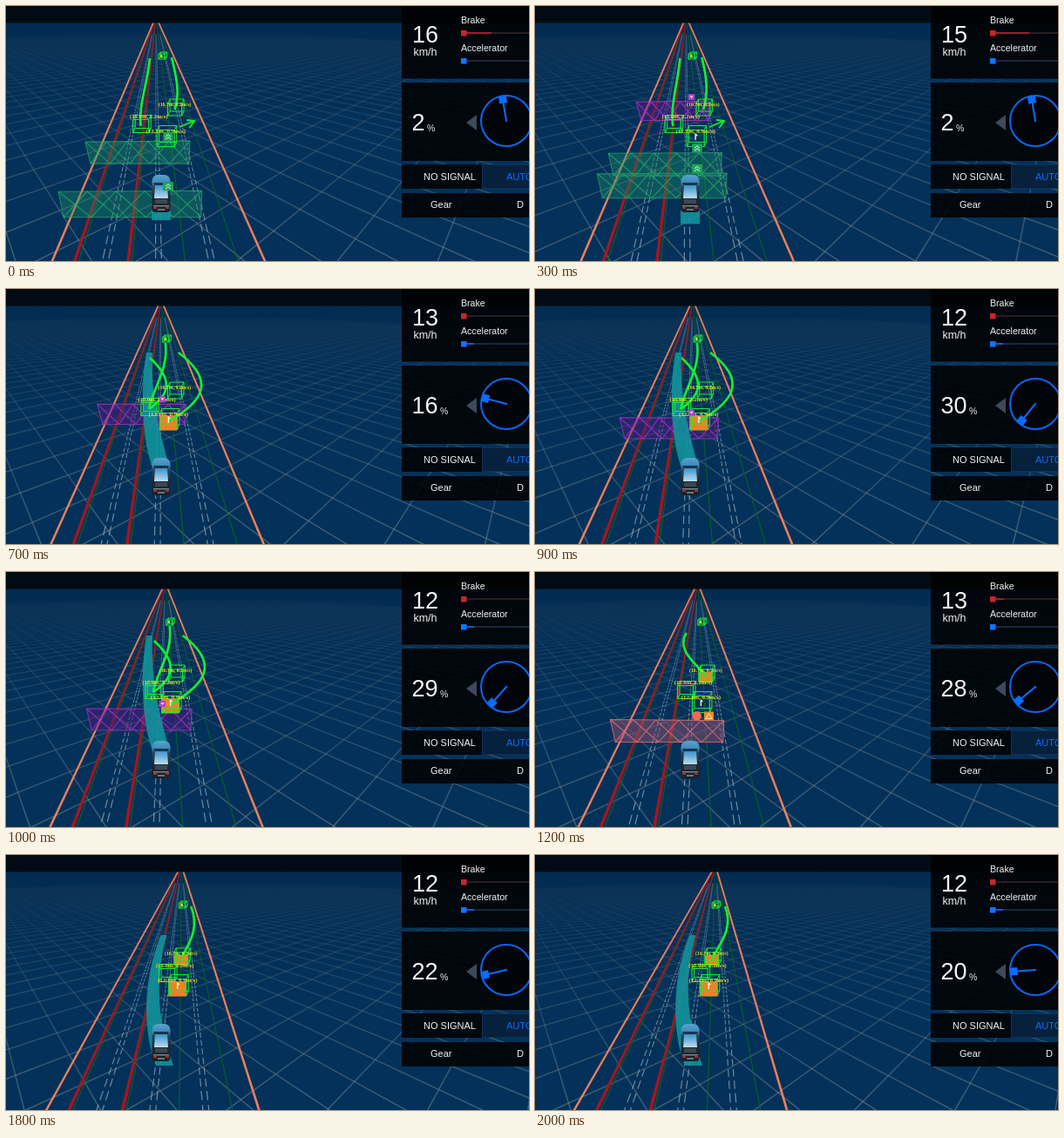
An HTML page with a canvas that plays this animation: 600 px wide and 293 px high, repeating every 2.1 s.

```html
<!DOCTYPE html>
<html lang="en">
<head>
<meta charset="utf-8">
<title>Driving view</title>
<style>
html, body { margin: 0; width: 100%; height: 100%; overflow: hidden; background: #032f57; }
canvas, svg { position: absolute; left: 0; top: 0; width: 600px; height: 293px; }
text { font-family: "Liberation Sans", Arial, sans-serif; fill: #f2f4f6; }
</style>
</head>
<body>
<canvas id="road" width="600" height="293"></canvas>
<svg viewBox="0 0 600 293">
  <g fill="#000" fill-opacity=".86">
    <rect x="454" y="0" width="146" height="83.5"/>
    <rect x="454" y="88" width="146" height="90"/>
    <rect x="454" y="182" width="146" height="28"/>
    <rect x="454" y="215" width="146" height="28"/>
  </g>
  <rect x="546.5" y="182.5" width="60" height="27" fill="#07203b" stroke="#0b3259"/>
  <text id="speed" x="481" y="42" font-size="27" text-anchor="middle"></text>
  <text x="481" y="57" font-size="12.5" text-anchor="middle">km/h</text>
  <text x="522" y="20" font-size="10.6">Brake</text>
  <text x="522" y="52" font-size="10.6">Accelerator</text>
  <path d="M522 31H600" stroke="#57343d"/>
  <path id="brake" stroke="#c21f2b" stroke-width="1.5"/>
  <rect x="522" y="28" width="6.5" height="6.5" fill="#c4272f"/>
  <path d="M522 63H600" stroke="#33496b"/>
  <path id="gas" stroke="#0b6cff" stroke-width="1.5"/>
  <rect x="522" y="60" width="6.5" height="6.5" fill="#1473ff"/>
  <text id="steer" x="465.5" y="143" font-size="27"></text>
  <text id="unit" y="144" font-size="10.5">%</text>
  <path d="M528 134L540 125V143Z" fill="#3d4a5a"/>
  <circle cx="574" cy="132" r="29" fill="#01050a" stroke="#0b66f5" stroke-width="2"/>
  <g id="wheel" fill="#0b6cff">
    <rect x="573" y="107" width="2" height="26"/>
    <rect x="569.5" y="103.5" width="9" height="8"/>
  </g>
  <text x="479" y="199.5" font-size="11">NO SIGNAL</text>
  <text x="574" y="199.5" font-size="11" style="fill:#0b6cff">AUTO</text>
  <text x="487" y="232" font-size="11">Gear</text>
  <text x="586" y="232" font-size="11">D</text>
</svg>
<script>
const g = document.getElementById('road').getContext('2d');
const el = id => document.getElementById(id);
const LOOP = 2100, STEP = 100;
const HORIZON = 12, DEPTH = 281, NEAR = 19, ROAD = 244;
const GREEN = '#14ee34';

// Each path leads from a tip beside the vanishing point to an obstacle.
const phases = [
  { name: 'cruise', until: 600, filled: [],
    paths: [{ to: 1, dx: -7, y: 60, bend: -3 }, { to: 0, dx: 18, y: 59, bend: 6 }] },
  { name: 'swerve', until: 1000, filled: [2],
    paths: [{ to: 1, dx: 5, y: 62, bend: 4 }, { to: 2, dx: 20, y: 73, bend: 42 }, { to: 1, dx: -13, y: 79, bend: 26 }] },
  { name: 'stop', until: 1600, filled: [0],
    paths: [{ to: 0, dx: -13, y: 70, bend: -12 }] },
  { name: 'pass', until: LOOP, filled: [0, 2],
    paths: [{ to: 0, dx: 11, y: 59, bend: 10 }] }
];
// u is the place across the road, from 0 to 1; drift is its change over the loop.
const obstacles = [
  { u: .72, drift: -.1, y: 119, w: 16, h: 14, text: '(16.7m, 0.2m/s)', size: 5.8, at: [0, -4] },
  { u: .33, drift: .17, y: 138, w: 18, h: 15, text: '(15.0m, 2.2m/s)', size: 6.7, at: [9, -9] },
  { u: .58, drift: .02, y: 152, w: 20, h: 19, text: '(12.1m, 0.9m/s)', size: 7, at: [0, -6] }
];
const walls = [
  { depth: 6.94, from: 0, to: 500 },
  { depth: 4.97, from: 0, to: 100 },
  { depth: 7.77, from: 200, to: 400 },
  { depth: 11.6, from: 200, to: 1600, ahead: true }
];
const paint = {
  go: ['rgba(28,140,98,.4)', 'rgba(42,175,110,.65)'],
  yield: ['rgba(88,24,128,.45)', 'rgba(170,48,200,.75)'],
  stop: ['rgba(150,80,115,.48)', 'rgba(232,112,108,.75)']
};

const mix = (a, b, p) => a + (b - a) * p;
const mixPoint = (a, b, p) => [mix(a[0], b[0], p), mix(a[1], b[1], p)];

function line(points, color, width, fill) {
  g.beginPath();
  points.forEach(p => g.lineTo(p[0], p[1]));
  if (fill) { g.closePath(); g.fillStyle = fill; g.fill(); }
  if (color) { g.strokeStyle = color; g.lineWidth = width; g.stroke(); }
}
function rect(x, y, w, h, color) {
  g.fillStyle = color;
  g.fillRect(x, y, w, h);
}

function view(t) {
  const p = t / 2000, swing = p ** 1.7;
  const vanish = 172 + 35 * swing, left = 53 - 8 * swing;
  const lane = (u, y) => [vanish + (left + ROAD * u - vanish) * (y - HORIZON) / DEPTH, y];
  return {
    t, p, swing, vanish, lane,
    travel: t / 40,
    phase: phases.find(f => t <= f.until),
    ground: (x, z) => lane(.5 + x / 14, HORIZON + DEPTH * NEAR / z)
  };
}

function drawGround({ ground, travel }) {
  const sky = g.createLinearGradient(0, 19, 0, 140);
  sky.addColorStop(0, '#022b51');
  sky.addColorStop(1, '#033159');
  rect(0, 0, 600, 293, sky);
  const fade = g.createLinearGradient(0, 30, 0, 293);
  [0, .25, .6, 1].forEach(p => fade.addColorStop(p, `rgba(125,140,148,${.5 * p})`));
  const cell = 4;
  for (const angle of [.65, .65 + Math.PI / 2]) {
    const c = Math.cos(angle), s = Math.sin(angle);
    const shift = (travel * s) % cell;
    for (let i = -60; i <= 60; i++) {
      const d = i * cell - shift;
      line([14, 260].map(z => ground(d * c - s * (z - d * s) / c, z)), fade, 1.5);
    }
  }
}

function drawRoad({ lane, travel }) {
  const stripe = (u, w, far, color) => {
    const [a, b] = [lane(u, 293), lane(u, 19)];
    line([[a[0] - w, 293], [a[0] + w, 293], [b[0] + far, 19], [b[0] - far, 19]], null, 0, color);
  };
  for (const u of [.125, .375, .625, .875]) stripe(u, .7, .4, 'rgba(10,100,36,.85)');
  for (const u of [.25, .5, .75])
    for (const off of [-.014, .014])
      for (let z = 18 - travel % 1.2; z < 260; z += 1.2)
        line([z, z + .8].map(d => lane(u + off, HORIZON + DEPTH * NEAR / d)), 'rgba(185,200,210,.6)', .6 + 12 / z);
  for (const u of [.106, .358]) stripe(u, 2, .6, '#a01725');
  for (const u of [0, 1]) stripe(u, 1.4, .9, '#ef805c');
}

function wallAt(w, { t, swing }) {
  const kind = !w.ahead ? 'go' : t > 1000 ? 'stop' : 'yield';
  const depth = Math.max(w.depth - .0047 * t, w.ahead ? 6.35 : 0);
  const y = HORIZON + 1000 / depth, h = 25 + .08 * (y - 156), side = 6 * swing;
  const x1 = 91 - .54 * (y - 156) + side, x2 = 211 + .24 * (y - 156) + side;
  return { kind, y, corners: [[x1, y], [x2, y - 1 + 5 * swing], [x2 - 1, y + h], [x1 + 6, y + h]] };
}

function drawWall({ kind, corners: [a, b, c, d] }) {
  const [fill, edge] = paint[kind], n = 5;
  line([a, b, c, d, a], edge, 1.1, fill);
  for (let i = 0; i < n; i++) {
    const p = i / n, q = (i + 1) / n;
    line([mixPoint(a, b, p), mixPoint(d, c, q)], edge, 1.2);
    line([mixPoint(a, b, q), mixPoint(d, c, p)], edge, 1.2);
  }
}

function drawBadge({ kind, y: top }) {
  const y = top - 6;
  if (kind === 'go') {
    const w = 8 + top / 50;
    rect(186 - w / 2, y - 5, w, 10, '#1fa35c');
    for (const o of [0, 3]) line([[183, y + o], [186, y - 2.5 + o], [189, y + o]], '#d9f5e4', 1);
  } else if (kind === 'yield') {
    rect(176, y - 3, 7, 7, '#b63bd0');
    line([[177.5, y - 1], [181.5, y - 1], [179.5, y + 2]], null, 0, '#f0d8f5');
  } else {
    const octagon = [...Array(8)].map((_, i) => {
      const r = (i + .5) * Math.PI / 4;
      return [185.5 + 5.6 * Math.cos(r), y + 2 + 5.6 * Math.sin(r)];
    });
    line(octagon, null, 0, '#f0685a');
    rect(194, y - 3, 11, 10, '#f08a1e');
    line([[199.5, y - 1], [203, y + 5], [196, y + 5], [199.5, y - 1]], '#fff0d0', 1);
  }
}

// Planned route: a band along a quadratic curve, wider towards the car
function band([x0, y0], bend, [x1, y1]) {
  const sides = [[], []];
  for (let s = 0; s <= 1.001; s += .05) {
    const x = mix(mix(x0, bend, s), mix(bend, x1, s), s), y = mix(y0, y1, s);
    const half = mix(3.5, 10, Math.min(1, s * 1.2));
    sides[0].push([x - half, y]);
    sides[1].unshift([x + half, y]);
  }
  line(sides.flat(), null, 0, 'rgba(18,150,158,.88)');
}

function drawRoute({ t, phase }) {
  if (phase.name === 'cruise') rect(167, 235, 22, 11 + 6 * Math.sin(t / 130), 'rgba(18,150,158,.88)');
  if (phase.name === 'swerve') band([164.5, 73], 158, [177, 203]);
  if (phase.name === 'pass') band([181, 92], 156, [182, 242]);
}

function drawCar() {
  const body = g.createLinearGradient(0, 194, 0, 238);
  [['#57a4d0', 0], ['#3f86b4', .22], ['#28475c', .3], ['#20272e', .6], ['#1b2025', 1]]
    .forEach(([c, p]) => body.addColorStop(p, c));
  g.fillStyle = body;
  g.beginPath();
  g.roundRect(167.5, 194, 21, 43, [7, 7, 4, 4]);
  g.fill();
  line([[169, 203], [187, 203], [185, 207], [171, 207]], null, 0, '#17364c');
  const roof = g.createLinearGradient(0, 206, 0, 222);
  roof.addColorStop(0, '#3d91ca');
  roof.addColorStop(1, '#c3e2f3');
  line([[171, 206], [185, 206], [186, 221], [170, 221]], null, 0, roof);
  rect(171, 222, 14, 5, '#3a4853');
  rect(169, 229, 18, 1.5, '#77838c');
  for (const x of [169, 183]) rect(x, 231, 4, 2, '#a03037');
  rect(174, 233, 8, 2, '#69747c');
}

function drawBox(x, y, w, h, depth) {
  const front = [[x, y], [x + w, y], [x + w, y + h], [x, y + h], [x, y]];
  const back = front.map(p => [p[0] + 2.5, p[1] - depth]);
  line(front, GREEN, 1.2);
  line(back, GREEN, 1);
  for (let i = 0; i < 4; i++) line([front[i], back[i]], GREEN, 1);
}

function drawTraffic({ p, vanish, lane, phase }) {
  const [far] = lane(.655, 57);
  drawBox(far - 3.5, 55, 7, 6, 2);
  rect(far - 2, 56, 3, 3, '#b5d829');

  const centers = obstacles.map(o => lane(o.u + o.drift * p, o.y));
  obstacles.forEach(({ w, h }, i) => {
    const x = centers[i][0] - w / 2, y = centers[i][1] - h / 2;
    if (phase.filled.includes(i)) rect(x, y + 3, w, h - 2, '#ee8326');
    drawBox(x, y, w, h, 5);
  });

  g.strokeStyle = GREEN;
  g.lineWidth = 2.7;
  phase.paths.forEach(({ to, dx, y, bend }) => {
    const [x2, y2] = centers[to], x = vanish + dx;
    g.beginPath();
    g.moveTo(x, y);
    g.bezierCurveTo(x + bend, mix(y, y2, .4), x2 + bend, mix(y, y2, .7), x2, y2);
    g.stroke();
  });

  const [x, y] = centers[2];
  if (phase.name === 'cruise') {
    line([[x + 16, y - 13], [x + 33, y - 20], [x + 24, y - 21]], GREEN, 1.8);
    line([[x + 33, y - 20], [x + 27, y - 12]], GREEN, 1.8);
  }
  line([[x, y + 2], [x, y - 5], [x + 2, y - 3]], '#f2fff2', 1.3);

  g.fillStyle = '#e8e020';
  g.textAlign = 'center';
  obstacles.forEach(({ text, size, at }, i) => {
    g.font = `bold ${size}px "Liberation Serif", serif`;
    g.fillText(text, centers[i][0] + at[0], centers[i][1] + at[1]);
  });
}

function drawPanel({ t, phase: { name } }) {
  const bump = .9 * Math.exp(-(((t - 1170) / 120) ** 2));
  const steer = Math.min(2 + .07 * Math.max(0, t - 500), 30.4 - .0094 * (t - 900));
  const percent = String(Math.round(steer));
  const brake = name === 'cruise' ? 557 + Math.min(10, t / 30) : name === 'stop' ? 538 : 528;
  const gas = name === 'swerve' || name === 'pass' ? 537 : 528;
  el('speed').textContent = Math.round(12 + Math.max(0, 4 - t / 200) + bump);
  el('steer').textContent = percent;
  el('unit').setAttribute('x', 468 + 15 * percent.length);
  el('wheel').setAttribute('transform', `rotate(${-4.7 * steer} 574 132)`);
  el('brake').setAttribute('d', `M522 31H${brake}`);
  el('gas').setAttribute('d', `M522 63H${gas}`);
}

function draw(t) {
  const scene = view(t);
  const shown = walls.filter(w => t >= w.from && t <= w.to).map(w => wallAt(w, scene));
  g.lineJoin = 'round';
  drawGround(scene);
  drawRoad(scene);
  shown.forEach(drawWall);
  drawRoute(scene);
  drawTraffic(scene);
  drawCar();
  shown.forEach(drawBadge);
  rect(0, 0, 600, 19.5, '#020b14');
  drawPanel(scene);
}

const start = performance.now();
let last = -1;
function tick() {
  const t = Math.floor((performance.now() - start) % LOOP / STEP) * STEP;
  if (t !== last) draw(last = t);
  requestAnimationFrame(tick);
}
tick();
</script>
</body>
</html>
```
